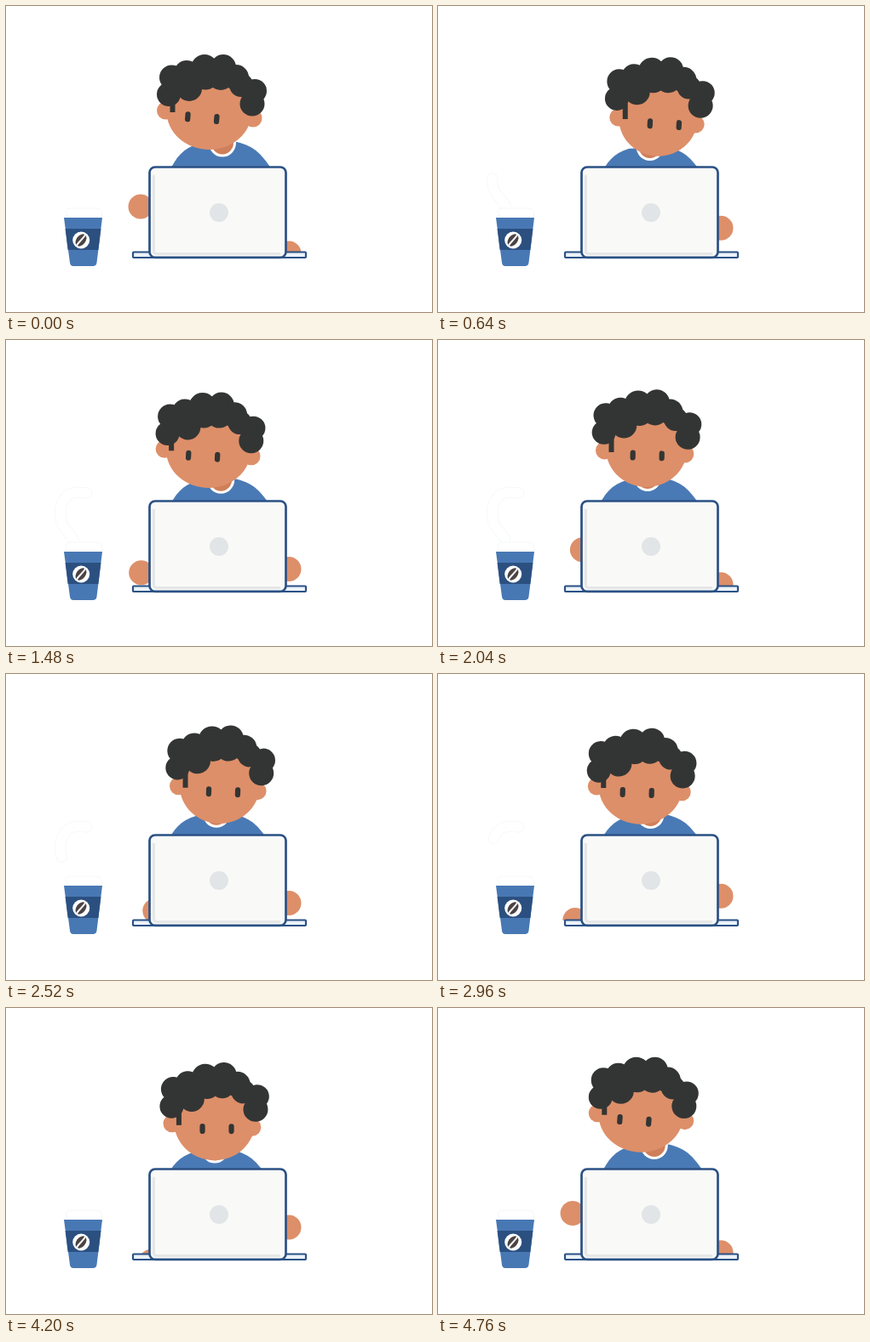
These frames come from a looping animation (500 by 360 pixels, 4800 ms). An HTML page with a canvas:

```html
<!DOCTYPE html>
<html lang="en">
<head>
<meta charset="utf-8">
<title>Typing at a laptop</title>
<style>
html, body { margin: 0; width: 100%; height: 100%; overflow: hidden; background: #fff; }
canvas { display: block; width: 500px; height: 360px; }
</style>
</head>
<body>
<canvas id="stage" width="500" height="360"></canvas>
<script>
const ctx = document.getElementById("stage").getContext("2d");
const LOOP = 4800, STEP = 40, BEAT = 400;
const SKIN = "#dd8f69", HAIR = "#333534", SHIRT = "#4a7ab5", NAVY = "#2b5080", EDGE = "#2b5185";

// Hair lobes: x, y, radius
const LOBES = [
  [191, 104, 14], [194.5, 84, 14.5], [212, 79, 15], [233, 73, 16], [255, 72, 15],
  [270, 84, 15], [292, 100, 14], [289, 115, 14.5], [215, 97, 15], [234, 83, 15.5],
  [252, 84, 15], [276, 93, 14]
];

function circle(x, y, r, color) {
  ellipse(x, y, r, r, color);
}

function ellipse(x, y, rx, ry, color) {
  ctx.fillStyle = color;
  ctx.beginPath();
  ctx.ellipse(x, y, rx, ry, 0, 0, Math.PI * 2);
  ctx.fill();
}

function shape(path, fill, stroke, width) {
  const p = new Path2D(path);
  if (fill) { ctx.fillStyle = fill; ctx.fill(p); }
  if (stroke) { ctx.strokeStyle = stroke; ctx.lineWidth = width; ctx.stroke(p); }
}

function roundRect(x, y, w, h, r, fill, stroke, width) {
  ctx.beginPath();
  ctx.roundRect(x, y, w, h, r);
  if (fill) { ctx.fillStyle = fill; ctx.fill(); }
  if (stroke) { ctx.strokeStyle = stroke; ctx.lineWidth = width; ctx.stroke(); }
}

function placed(x, y, angle, draw) {
  ctx.save();
  ctx.translate(x, y);
  ctx.rotate(angle);
  draw();
  ctx.restore();
}

// Offset travelling left (0) -> centre -> right -> centre, one beat each
function sway(t, centre, right) {
  const keys = [0, centre, right, centre];
  const beat = Math.floor(t / BEAT), u = (t % BEAT) / BEAT;
  const from = keys[beat % 4], to = keys[(beat + 1) % 4];
  return from + (to - from) * u * (2 - u);
}

function drawBody(t, nod) {
  placed(sway(t, -5, 0) - nod, sway(t, 2.5, 1) + 5 * nod, 0, () =>
    shape("M192 194 C199 179 208 167 226 162 L271 160 C293 165 301 176 313 194 Z", SHIRT));
  const x = 254 + sway(t, -9, -3) - 1.5 * nod, y = 161 + 5 * nod;
  ellipse(x, y, 16, 16.5, "#fff");
  ellipse(x, y, 13, 13.5, "#cf7f59");
}

function drawHead(t, nod) {
  const rot = (sway(t, -3.9, 0.5) - 1.5 * nod) * Math.PI / 180;
  const drop = 7 * nod;
  const earX = 187.5 + sway(t, 2.9, 31) - 2.5 * nod;
  const earY = 123 + sway(t, 7.6, 0.6) + drop;
  const farX = 290 + sway(t, -4.2, 18) - 2.5 * nod;
  const farY = 132 + sway(t, 1.5, 0.6) + drop;

  circle(earX, earY, 10.5, SKIN);
  circle(farX, farY, 10.5, SKIN);
  shape(`M${earX + 6} ${earY - 1} L${farX - 6} ${farY - 6}`, null, SKIN, 20);
  ellipse(238.5 + sway(t, 2, 25) - 1.5 * nod, 124 + sway(t, 3.8, 1) + drop,
    50 + sway(t, -2, -4), 45, SKIN);

  const eyesX = 230.3 + sway(t, 9.5, 40.5), eyesY = 131.7 + sway(t, 4.3, 0.6) + drop;
  placed(eyesX, eyesY, rot + 0.08, () => {
    for (const side of [-17, 17]) roundRect(side - 3.1, -6, 6.2, 12, 3.1, HAIR);
  });

  ctx.fillStyle = HAIR;
  ctx.fillRect(earX + 5, earY - 16, 6, 18);
  placed(242 + sway(t, -1.8, 25) - 2.3 * nod, 95 + sway(t, 2.5, -3.8) + drop, rot, () => {
    ctx.translate(-242, -95);
    shape("M191 104 L194 84 L233 73 L255 72 L270 84 L292 100 L289 115 L268 90 L215 97 Z", HAIR);
    LOBES.forEach(([x, y, r]) => circle(x, y, r, HAIR));
  });
}

function drawHands(t, nod) {
  ctx.save();
  ctx.beginPath();
  ctx.rect(0, 0, 500, 290);
  ctx.clip();
  circle(158 + sway(t, 8, 26), 236 + sway(t, 5.4, 5) + 57 * nod, 14.5, SKIN);
  circle(332, 291 - 33 * nod, 14.5, SKIN);
  ctx.restore();
}

function drawLaptop() {
  roundRect(149, 289.5, 203, 6.5, 1, "#eaf2f9", EDGE, 2.2);
  roundRect(168.5, 189.5, 160, 106.3, 6.5, "#f9f9f8", EDGE, 2.7);
  ctx.lineCap = "round";
  shape("M173.5 200 V288 Q173.5 291.5 177 291.5 H321", null, "#e5e6e6", 3);
  circle(250, 243, 11, "#e1e5e7");
}

function drawCup() {
  shape("M72 248 L70 241 Q71 238 76 238 H106 Q111 238 112 241 L113 248", "#fff", "#f6f7f7", 1);
  shape("M68 249 H113 L106.5 302 Q106 306 102 306 H79 Q75.5 306 75 302 Z", "#4878b4");
  shape("M69.6 262 H111.4 L108.4 287 H72.6 Z", NAVY);
  circle(88.2, 275.5, 10, "#fff");
  placed(88, 275.5, 0.65, () => {
    ellipse(0, 0, 5.4, 8, "#4a4344");
    shape("M0 -9 C1.5 -3 -1.5 3 0 9", null, "#fff", 1.9);
  });
}

function drawSteam(t) {
  const clamp = v => Math.min(1, Math.max(0, v));
  const head = clamp((t - 200) / 1300), tail = clamp((t - 2000) / 2300);
  if (head <= tail) return;
  const length = 115;
  ctx.save();
  ctx.lineCap = "round";
  ctx.setLineDash([(head - tail) * length, 400]);
  ctx.lineDashOffset = -tail * length;
  const path = "M80 237 C74 224 65 222 64 208 C62 194 70 181 79 180 C87 178 90 180 95 180";
  shape(path, null, "#f3f7f8", 13);
  shape(path, null, "#fff", 11.5);
  ctx.restore();
}

function draw(t) {
  const nod = (1 - Math.cos(2 * Math.PI * t / BEAT)) / 2;
  ctx.fillStyle = "#fff";
  ctx.fillRect(0, 0, 500, 360);
  ctx.lineCap = "butt";
  drawSteam(t);
  drawCup();
  drawBody(t, nod);
  drawHead(t, nod);
  drawHands(t, nod);
  drawLaptop();
}

const start = performance.now();
function frame() {
  const t = (performance.now() - start) % LOOP;
  draw(Math.floor(t / STEP) * STEP);
  requestAnimationFrame(frame);
}
frame();
</script>
</body>
</html>
```
